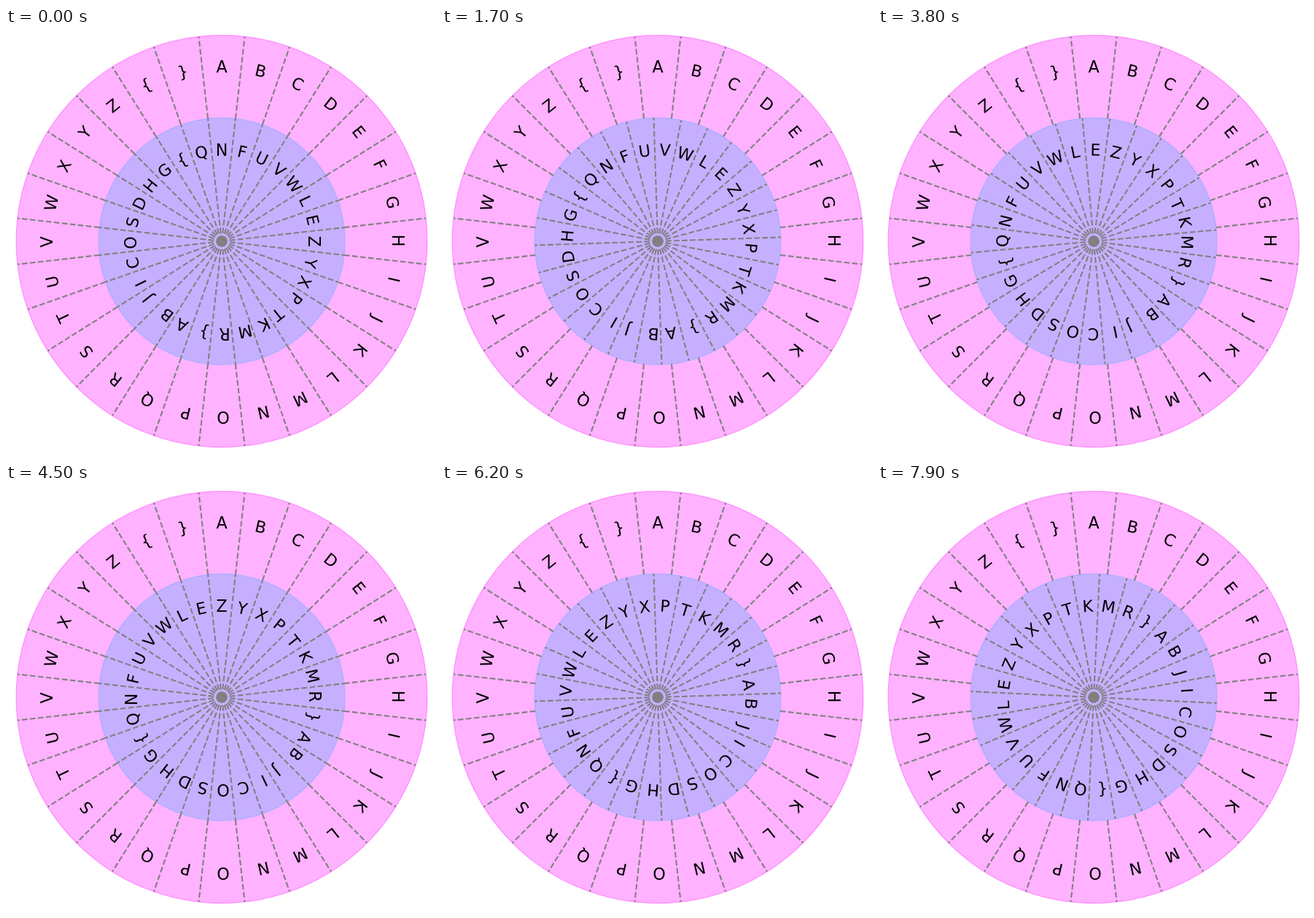
These frames come from a looping animation (590 px wide and 586 px high, 8 s). An HTML page with a canvas:

```html
<!DOCTYPE html>
<html lang="en">
<head>
<meta charset="utf-8">
<title>Cipher wheel</title>
<style>
  html, body { margin: 0; width: 100%; height: 100%; overflow: hidden; background: #fff; }
  canvas { display: block; }
</style>
</head>
<body>
<canvas id="wheel" width="590" height="586"></canvas>
<script>
  const OUTER = "ABCDEFGHIJKLMNOPQRSTUVWXYZ{}";
  const INNER = "NFUVWLEZYXPTKMR}ABJICOSDHG{Q";
  const CX = 296, CY = 292;
  const R_OUT = 282, R_IN = 169;
  const SECTOR = 360 / OUTER.length;
  const STEP_MS = 100, STEPS = 80, STEP_DEG = -2;
  const FONT = '22.2px "DejaVu Sans", sans-serif';

  const ctx = document.getElementById("wheel").getContext("2d");
  const rad = deg => deg * Math.PI / 180;

  function disc(radius, color) {
    ctx.globalAlpha = 0.3;
    ctx.fillStyle = ctx.strokeStyle = color;
    ctx.lineWidth = 1.39;
    ctx.setLineDash([]);
    ctx.beginPath();
    ctx.arc(CX, CY, radius, 0, 2 * Math.PI);
    ctx.fill();
    ctx.stroke();
    ctx.globalAlpha = 1;
  }

  function spokes(from, to, turn) {
    ctx.strokeStyle = "#808080";
    ctx.lineWidth = 2.08;
    ctx.setLineDash([7.7, 3.33]);
    for (let i = 0; i < OUTER.length; i++) {
      const a = rad((i + 0.5) * SECTOR + turn);
      const x = Math.sin(a), y = -Math.cos(a);
      ctx.beginPath();
      ctx.moveTo(CX + x * from, CY + y * from);
      ctx.lineTo(CX + x * to, CY + y * to);
      ctx.stroke();
    }
  }

  // Glyph ink starts at the left of its advance box; the side bearing shifts it on screen.
  function letters(text, baseline, turn) {
    ctx.fillStyle = "#000";
    ctx.font = FONT;
    [...text].forEach((ch, i) => {
      const m = ctx.measureText(ch);
      const bearing = -m.actualBoundingBoxLeft;
      ctx.save();
      ctx.translate(CX + bearing, CY + 1);
      ctx.rotate(rad(i * SECTOR + turn));
      ctx.fillText(ch, -m.width / 2 - bearing, -baseline);
      ctx.restore();
    });
  }

  function draw(turn) {
    ctx.fillStyle = "#fff";
    ctx.fillRect(0, 0, 590, 586);
    disc(R_OUT, "#ff00ff");
    spokes(R_IN, R_OUT, 0);
    letters(OUTER, 231.8, 0);
    disc(R_IN, "#42aaff");
    spokes(0, R_IN, turn);
    letters(INNER, 118.4, turn);
  }

  let shown = -1;
  function tick(now) {
    const step = Math.floor(now / STEP_MS) % STEPS;
    if (step !== shown) {
      shown = step;
      draw(step * STEP_DEG);
    }
    requestAnimationFrame(tick);
  }
  draw(0);
  requestAnimationFrame(tick);
</script>
</body>
</html>
```
